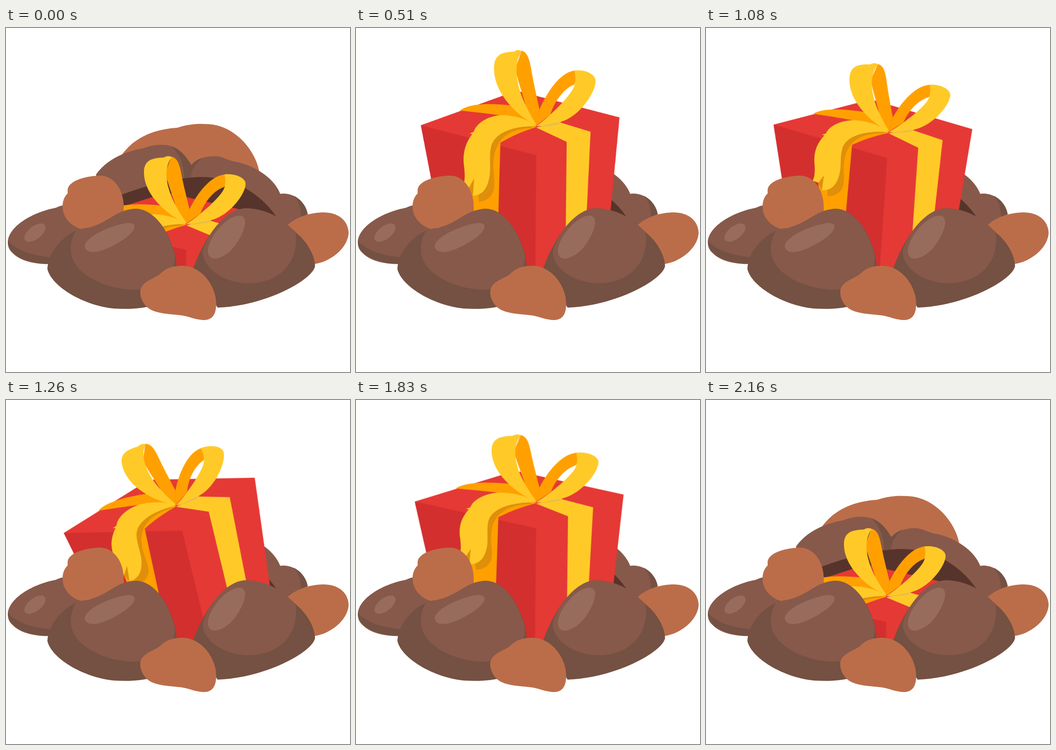
These frames come from a looping animation (748 by 748 pixels, 2.7 s). An HTML page without scripts:

```html
<!DOCTYPE html>
<html lang="en">
<head>
<meta charset="utf-8">
<title>Gift in the rocks</title>
<style>
  html, body { margin: 0; width: 100%; height: 100%; overflow: hidden; background: #fff; }
  svg { display: block; width: 100%; height: 100%; }

  .clay { fill: #bb6d49; }
  .rock { fill: #87594a; }
  .shade { fill: #745142; }
  .shine { fill: #986c5c; }
  .cave { fill: #56342b; }
  .red { fill: #e53935; }
  .deep { fill: #d32f2f; }
  .gold { fill: #ffca28; }
  .amber { fill: #ffa000; }
  .fold { fill: #df8f0b; }
  .crease { fill: #e9be4c; }

  .wobble, .jump {
    animation: 2700ms cubic-bezier(.333, 0, .667, 1) infinite;
  }
  .wobble { transform-origin: 394px 319px; animation-name: wobble; }
  .jump { transform-origin: 392px 217px; animation-name: jump; }

  /* hidden > stretched peak > wide squash > rest, then back the same way */
  @keyframes jump {
    0%, 8.889%, 80%, 100% { transform: translate(0, 212px) scale(1, .893); }
    22.222%, 75.556% { transform: translate(0, -39px) scale(1, 1.02); }
    26.667%, 71.111% { transform: translate(-2.5px, -10.6px) scale(1.31, .893); }
    31.111%, 66.667% { transform: translate(0, 12px) scale(1, .893); }
  }
  @keyframes wobble {
    0%, 38.889%, 52.222%, 100% { transform: rotate(0deg); }
    43.333% { transform: rotate(20deg); }
    47.778% { transform: rotate(-20deg); }
  }
</style>
</head>
<body>
<svg viewBox="0 0 748 748" xmlns="http://www.w3.org/2000/svg">
  <clipPath id="ground"><rect width="748" height="530"/></clipPath>

  <g id="back">
    <path class="clay" d="M249 280C275 240 320 220 372 217C400 208 420 208 440 209C500 212 545 270 551 315L400 340Z"/>
    <path class="rock" d="M196 318C220 285 260 268 297 262C320 253 342 251 362 258C382 265 395 285 403 298L400 400H196Z"/>
    <path class="shade" d="M360 257C382 265 395 285 403 298V340H386C390 305 382 280 360 257Z"/>
    <path class="rock" d="M403 298C415 285 435 277 460 279C475 281 485 289 500 291C545 300 585 330 596 360L604 430H400Z"/>
    <path class="shade" d="M403 298C410 290 418 285 428 282C410 295 402 310 402 330H395Z"/>
    <path class="rock" d="M594 361C622 355 651 376 656 405L610 434L590 417Z"/>
    <path class="shade" d="M626 365C643 373 654 390 656 405L641 410C642 394 637 377 626 365Z"/>
    <path class="cave" d="M240 367C320 335 390 324 425 324C500 324 560 365 592 417L560 450H240Z"/>
  </g>

  <g clip-path="url(#ground)">
    <g class="wobble"><g class="jump">
      <path class="red" d="M141 212L349 137L573 195L538 560L389 620L208 560Z"/>
      <path class="deep" d="M141 212L392 277L389 620L208 560Z"/>

      <path class="amber" d="M226 180C245 165 288 163 338 169L392 212C372 200 345 192 226 180Z"/>
      <path class="amber" d="M338 169C362 185 380 198 392 213C374 200 350 193 318 190Z"/>
      <path class="amber" d="M392 216C372 222 345 232 314 250L309 420L304 560H276L245 345L290 250L325 205L390 212Z"/>
      <path class="gold" d="M392 217L458 248L455 560H494L510 226L444 206Z"/>

      <path class="fold" d="M384 214C340 213 300 225 290 262L258 327L245 346L254 366L266 362L267 378C282 378 297 368 300 350C303 325 296 310 300 283C304 245 330 220 379 218Z"/>
      <path class="gold" d="M392 213C368 196 340 190 316 190C285 192 262 208 256 226L247 230L253 231C234 255 232 280 235 302C237 322 237 332 233 343L246 347L257 327L254 365C273 365 285 352 290 325C294 302 289 285 293 262C297 235 328 215 384 214Z"/>

      <path class="amber" d="M360 50C373 53 377 70 380 85C385 115 393 150 399 178L393 212L365 175L368 166C362 145 357 130 353 116L346 90Z"/>
      <path class="gold" d="M391 212C345 188 300 140 300 88C300 58 318 53 343 52C350 47 356 48 361 51C347 67 346 100 354 128C360 155 377 186 393 212Z"/>
      <path class="amber" d="M399 178C415 140 445 95 477 93L483 110L474 124C455 130 432 158 423 188L393 212Z"/>
      <path class="gold" d="M475 93C500 90 521 102 521 116C521 140 488 190 450 203C430 210 412 214 392 214C425 190 470 145 475 125C478 112 477 102 475 93Z"/>
      <path class="crease" d="M392 217C410 211 430 208 447 204L440 210C425 214 408 214 392 217Z"/>
    </g></g>
  </g>

  <g id="front">
    <path class="rock" d="M4 465C6 430 60 400 108 391C115 388 120 386 128 385L180 430L100 513C60 515 30 505 15 490C6 482 4 475 4 465Z"/>
    <path class="shade" d="M4 463C22 482 55 497 110 499L98 513C50 513 4 495 4 463Z"/>
    <ellipse class="shine" cx="63" cy="445" rx="27" ry="14" transform="rotate(-38 63 445)"/>
    <path class="clay" d="M134 352C136 330 180 321 205 321C237 322 256 355 256 388V405L230 425L163 437C145 432 123 415 123 388C123 375 128 365 134 360Z"/>
    <path class="clay" d="M608 432C630 411 660 401 692 401C730 402 745 425 745 447C742 480 705 508 672 513L630 500Z"/>

    <path class="shade" d="M90 524C92 485 125 453 152 441L165 437C195 433 215 420 230 411C248 400 262 394 282 393C322 394 353 440 366 487C369 500 371 510 371 520L330 600C300 611 265 612 235 610C165 603 98 560 90 524Z"/>
    <path class="rock" d="M141 482C141 462 146 450 153 440L165 437C195 433 215 420 230 411C248 400 262 394 282 393C321 394 351 440 363 480C369 497 368 511 361 524C345 557 310 569 275 569C210 567 141 532 141 482Z"/>
    <path class="shine" d="M171 475C173 450 243 424 268 424C286 425 282 440 262 455C232 477 178 503 171 475Z"/>

    <path class="shade" d="M407 524C425 470 470 392 523 392C570 393 605 420 632 446C655 465 672 495 672 518C665 550 560 605 460 608L430 560Z"/>
    <path class="rock" d="M428 484C444 435 486 392 523 392C570 393 608 418 630 446C637 505 600 553 530 555C470 556 425 518 428 484Z"/>
    <path class="shine" d="M439 485C440 455 480 408 508 408C530 410 518 445 500 470C480 500 440 515 439 485Z"/>

    <path class="clay" d="M292 572C294 552 318 547 335 535C350 520 365 517 385 517C425 518 457 560 457 600C457 625 447 635 430 635C415 635 400 628 383 625C360 622 325 622 308 608C297 598 291 585 292 572Z"/>
  </g>
</svg>
</body>
</html>
```
